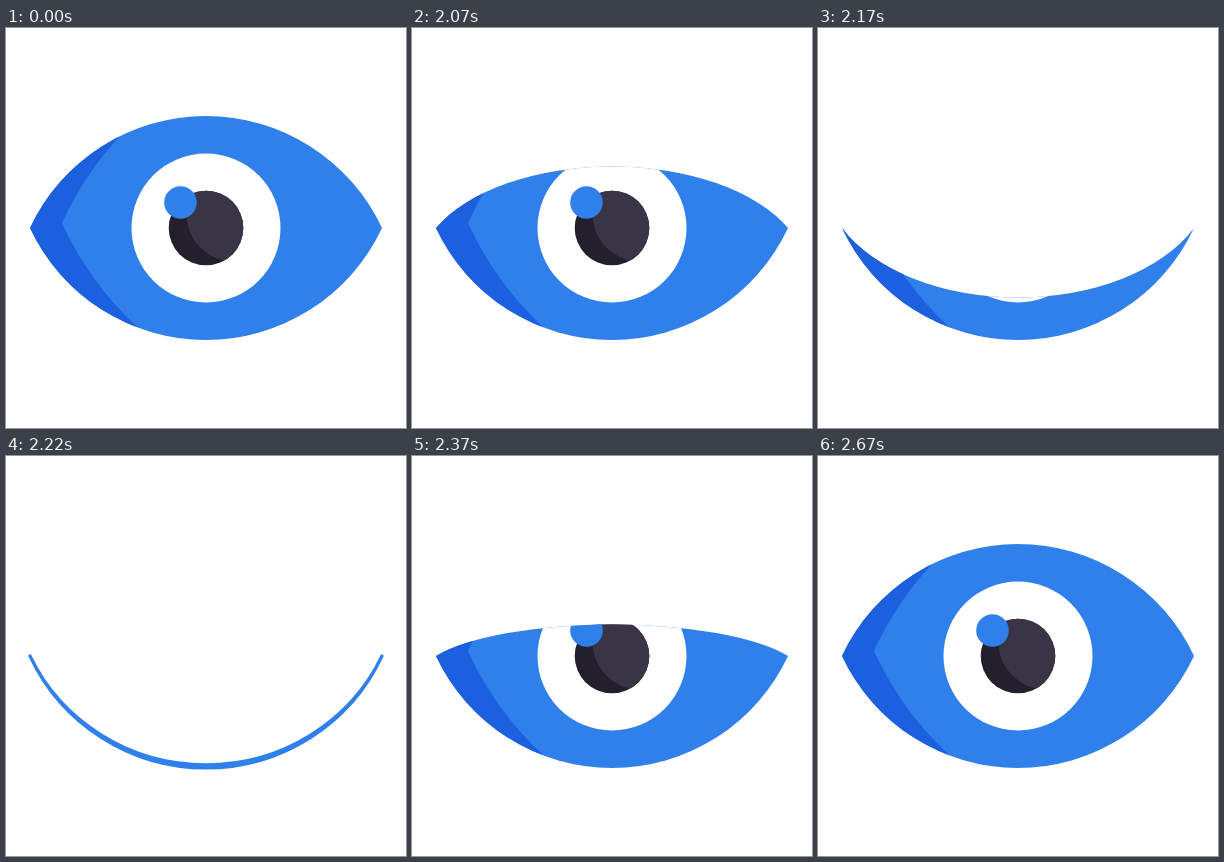
An HTML page for the animation above (2.7 s loop, 400 by 400 pixels).

```html
<!DOCTYPE html>
<html lang="en">
<head>
<meta charset="utf-8">
<title>Blinking eye</title>
<style>
  html, body { margin: 0; width: 100%; height: 100%; overflow: hidden; background: #fff; }
  svg { display: block; width: 100vw; height: 100vh; }
</style>
</head>
<body>
<svg viewBox="0 0 400 400">
  <defs>
    <clipPath id="opening"><path id="lids"/></clipPath>
    <clipPath id="pupil"><circle cx="200" cy="200" r="37.3"/></clipPath>
  </defs>
  <g clip-path="url(#opening)">
    <rect width="400" height="400" fill="#2f80ea"/>
    <path fill="#1c60df" d="M117 104L113 109Q78 147 56 195Q83 254 130 298L134 302L0 330V80Z"/>
    <circle cx="200" cy="200" r="74.5" fill="#fff"/>
    <g clip-path="url(#pupil)">
      <rect x="160" y="160" width="80" height="80" fill="#231f2c"/>
      <circle cx="228" cy="186" r="47.5" fill="#3a3446"/>
    </g>
    <circle cx="174.5" cy="174.5" r="16.3" fill="#2f80ea"/>
  </g>
  <path id="lash" fill="none" stroke="#2f80ea" stroke-linejoin="round" stroke-linecap="round"/>
</svg>
<script>
const LOOP = 2700;
const CLOSE = { start: 1997, length: 241 };
const OPEN = { start: 2245, length: 420 };
const LASH = { peak: 2245, fade: 40, width: 8 };
const RADIUS = 194.3;

const lids = document.getElementById('lids');
const lash = document.getElementById('lash');

const progress = (t, { start, length }) => Math.min(1, Math.max(0, (t - start) / length));
const smooth = u => u * u * (3 - 2 * u);

// cubic-bezier(.306, 0, 0, 1), solved by bisection
function settle(x) {
  let low = 0, high = 1;
  for (let i = 0; i < 30; i++) {
    const u = (low + high) / 2;
    if (3 * (1 - u) ** 2 * u * 0.306 + u ** 3 < x) low = u;
    else high = u;
  }
  return smooth(high);
}

// 1 is wide open, -1 rests on the lower lid
function lidPosition(t) {
  if (t < OPEN.start) return 1 - 2 * smooth(progress(t, CLOSE));
  const p = progress(t, OPEN);
  return p === 1 ? 1 : 2 * settle(p) - 1;
}

function draw(t) {
  const lid = lidPosition(t);
  const upper = `A${RADIUS} ${RADIUS * Math.abs(lid)} 0 0 ${lid > 0 ? 1 : 0} 376 200`;
  const shape = `M24 200${upper}A${RADIUS} ${RADIUS} 0 0 1 24 200Z`;
  const width = LASH.width * Math.max(0, 1 - Math.abs(t - LASH.peak) / LASH.fade);
  lids.setAttribute('d', shape);
  lash.setAttribute('d', shape);
  lash.setAttribute('stroke-width', width);
  lash.setAttribute('visibility', width > 0 ? 'visible' : 'hidden');
}

const begin = performance.now();
function tick() {
  draw((performance.now() - begin) % LOOP);
  requestAnimationFrame(tick);
}
draw(0);
requestAnimationFrame(tick);
</script>
</body>
</html>
```
